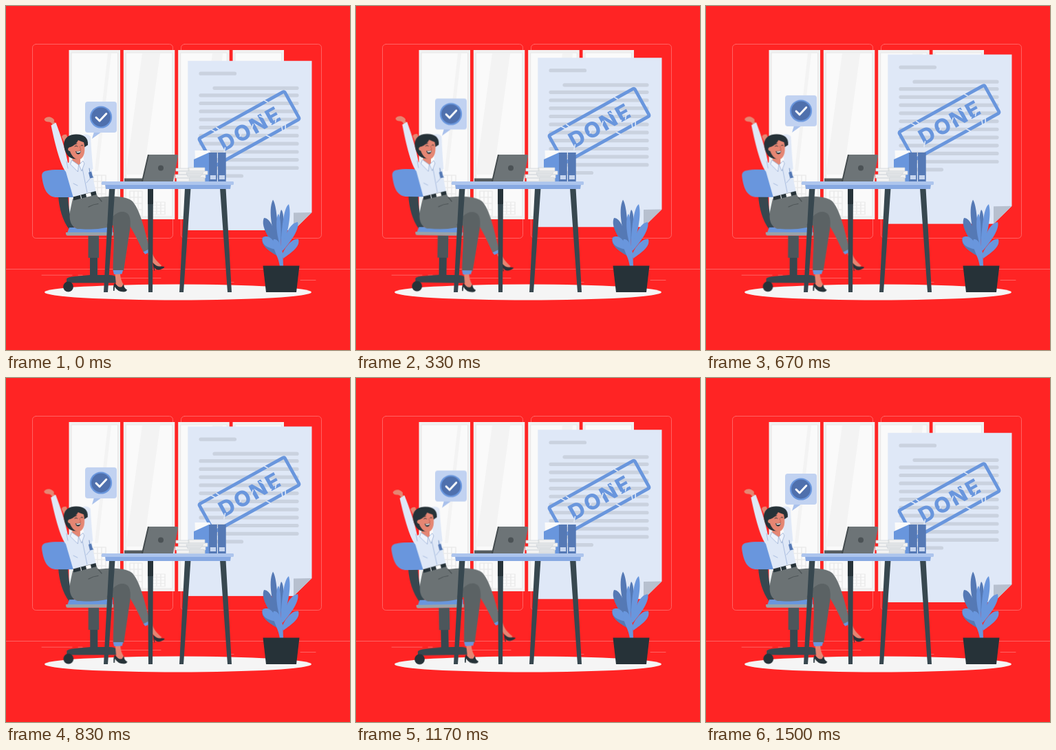
Animation of 500 by 500 pixels, one loop 1540 ms. Source, as an HTML page:

```html
<!DOCTYPE html>
<html lang="en">
<head>
<meta charset="utf-8">
<title>Done</title>
<style>
  html, body { margin: 0; width: 100%; height: 100%; overflow: hidden; background: #ff2424; }
  svg { display: block; width: 100%; height: 100%; }
  .float { animation: float 1540ms linear infinite; }
  .sway { transform-origin: 141px 288px; animation: sway 1540ms linear infinite; }
  @keyframes float {
    0%, 97.4%, 100% { transform: translateY(0); }
    48.7% { transform: translateY(-10.2px); }
  }
  @keyframes sway {
    0%, 100% { transform: rotate(0); }
    25% { transform: rotate(1deg); }
    75% { transform: rotate(-1deg); }
  }
  .blue { fill: #6996dd; }
  .navy { fill: #5579b5; }
  .pale { fill: #dfe8f7; }
  .skin { fill: #e58673; }
  .ink { fill: #263238; }
  .slate { fill: #37474f; }
  .line { fill: none; stroke-linecap: round; stroke-linejoin: round; }
  .stamp { font: 800 31px Inter, "Open Sans", sans-serif; letter-spacing: 2.6px; }
</style>
</head>
<body>
<svg viewBox="0 0 500 500">
  <defs>
    <g id="pane">
      <path fill="#f1f1f1" d="M0 0h74.5v246H0z"/>
      <path fill="#fafafa" stroke="#e4e4e4" stroke-width=".8" d="M3.5 4h67.5v238H3.5z"/>
    </g>
    <g id="block" class="line" stroke="#ebebeb" stroke-width="1.6">
      <path d="M0 0h18v36H0zM0 9h18M0 18h18M0 27h18M6 0v36M12 0v36"/>
    </g>
  </defs>

  <!-- room -->
  <g class="line" stroke="#ff7474" stroke-width=".8">
    <rect x="38.5" y="55.5" width="204" height="282" rx="5"/>
    <rect x="254.500" y="55.5" width="204" height="282" rx="5"/>
    <path d="M0 382.500H500M52 391.200H96M105 391.200h6M165 395.500H225M322 401.500h9M428 398.500H450"/>
  </g>
  <use href="#pane" x="91.500" y="64"/>
  <use href="#pane" x="170.800" y="64"/>
  <use href="#pane" x="250.200" y="64"/>
  <use href="#pane" x="329.500" y="64"/>
  <g fill="#f3f3f3">
    <path d="M148 69h5L134 240h-5zM198 69h26L200 245h-26zM300 69h15l-4 40h-16z"/>
  </g>
  <use href="#block" x="127" y="246"/>
  <use href="#block" x="180" y="269"/>
  <use href="#block" transform="translate(213 285) scale(1 .5)"/>
  <ellipse cx="250" cy="416" rx="194" ry="11.500" fill="#f5f5f5"/>

  <!-- document -->
  <g class="float">
    <path class="pale" d="M264.300 79.700H444.500V300L418 326H264.300z"/>
    <path fill="#b7c0cf" d="M444.500 300L418 326V300.500z"/>
    <path class="line" stroke="#cad2df" stroke-width="5.200" d="M283 98.200h49.500M303 119.300H423M283 129.800H423M283 141.500H423M283 153.200H423M283 165H423M283 176.700H423M283 188.400H423M283 200.200H423M283 212H423M283 223.600H423M283 235.400H423M283 247h59.500"/>
    <g transform="translate(353.500 178.500) rotate(-29)">
      <rect class="line" x="-71" y="-23" width="142" height="46" rx="2" stroke="#6996dd" stroke-width="4.800"/>
      <text class="stamp blue" x="1.300" y="11.300" text-anchor="middle">DONE</text>
      <path class="line" stroke="#dfe8f7" stroke-width="1.600" d="M39 -26l3 5M-49 -26l4 6M-41 -25l2 4M17 20l4 6M43 20l-2 6M49 20l-3 6M-44 7l-5 6M-27 -9l4 5M-12 -1l-5 4M8 -3l-5 5M22 -9l5 6M26 6l6 3M42 5l-4 5"/>
    </g>
  </g>

  <!-- chair and woman -->
  <g class="sway">
    <path class="slate" d="M76 276h14C91 294 93 308 99 322l-7 3C82 312 77 293 76 276z"/>
    <path class="blue" d="M59 239.500C67 237.800 77 237.800 88 238.500L99 278H74C61 278 55 268 52.300 249C51.500 243 54 240.200 59 239.500z"/>
    <path class="blue" d="M92 322h63v8H89z"/>
    <path fill="#99a3a9" d="M87 329h69v4.800H89Q86.500 333 87 329z"/>
    <path fill="#4c565b" d="M119.500 334H135v32h-15.500z"/>
    <path class="slate" d="M122 366h11v25h17q8 0 10 3v8.500H88v-6q2-3 12-3.500l22-2z"/>
    <circle class="ink" cx="90.500" cy="408" r="7.400"/>

    <!-- legs -->
    <path class="skin" d="M206 360l6-3c2 8 6 13 14 20l-3 4c-7-2-10-9-17-21z"/>
    <path class="ink" d="M213.500 373q5 6 11 5.500 5-.5 6 1-2 2.500-8 4-5 .5-7-4l.8 5h-1.300z"/>
    <path class="skin" d="M158.500 389h7.500c0 7 3 13 6 18l-4 4-8-6z"/>
    <path class="ink" d="M158 402.500q6 8 10.500 5.500l2.500-4q0 6 5 8.500-1 3-5 3-9 0-13-7.500l-.5 6H156q-.5-8 2-11.500z"/>
    <path fill="#6b7274" d="M97 280L131 273l3 5C155 275.500 176 276 184 284C197 300 202 330 209 353l-9 5C190 337 180 316 169 306L155 319C143 325 119 325 104 324C92 320 91 306 94 294z"/>
    <path class="line" stroke="#4c5355" stroke-width="1.200" d="M120 292q7-4 14-4.500M134 278l5 6"/>
    <path fill="#5b6264" d="M146 319C153 307 160 299 169 299C179 299 182 308 180.500 322L171 385H155.500C155.500 360 158 343 156 319z"/>
    <path class="blue" d="M155.500 384H170l-1.500 5.500-11.500.5zM199.500 357.500l9-4.500.8 4.800-7 3z"/>

    <!-- far arm, torso, near arm -->
    <path class="skin" d="M81 190q2-4 7-3l3 9-6 3z"/>
    <path class="pale" d="M109 188Q119 184 123 190Q124 211 126.500 237L116 241L113 224z"/>
    <path class="skin" d="M73 171l-5 3c-1-3-2-5-5-5.500-4 .2-6.500-1-7.500-3.500 1-3.500 6-4.500 9-3.500 4 1.500 7 4 5 6.500z"/>
    <path class="pale" d="M65.500 173.500L72.500 169.500C79 187 86 207 90 228L96 225L113 228L123 233Q126 240 125.500 246L131 271L98 279L87 241C80 233 72 205 65.500 173.500z"/>
    <path class="ink" d="M97.500 277.500l33-8.500 1 5-33 8.500z"/>
    <path fill="#fff" d="M116 273l7-1.800 1 5-7 1.500zM108 275l1-.3 1 5-1 .3z"/>
    <path class="line" stroke="#a9bddf" stroke-width="1" d="M111 236l7 35M88 226l2 10M122 251l-5 6M98 258l6 3"/>
    <path class="skin" d="M97 215l11 5v9l-4 4-8-6z"/>
    <path fill="#eef3fc" stroke="#9aafd3" stroke-width=".8" d="M95.500 224l10 7-1 10-11-11zM106 231l6-6 2 4-4 11z"/>
    <path class="navy" d="M120 242l4-1.500 2.500 9-4.500 1z"/>
    <path class="line" stroke="#5579b5" stroke-width=".8" d="M121 236l1 7M124 246l3 3"/>

    <!-- head -->
    <path class="ink" d="M84 201C85 189 95 186 103 186.500C113 187 120 191 119 202L113 206L105 222C92 224 85 215 84 201z"/>
    <path class="skin" d="M94 205C99 203 103 199 105 195C108 196 112 198 113 198C116 209 114 221 107 223C100 224 95 217 93 211C89 211 89 205 94 205z"/>
    <path class="line" stroke="#263238" stroke-width=".9" d="M100 204q2-2 4 0M109 203q2-2 3 0M100 201l3-1"/>
    <path class="line" stroke="#bd5d50" stroke-width=".8" d="M107 204l2 5-2 .5"/>
    <path class="ink" d="M101 211q4 1 8-.5-1 5-4 5-3 0-4-4.500z"/>
    <path fill="#fff" d="M102 211.500q3 .8 6.500-.4l-.5 1.500q-3 1-5 .5z"/>
  </g>

  <!-- speech bubble -->
  <g class="float">
    <path fill="#a9c1ec" d="M128 183h11l-14 10z"/>
    <rect x="115" y="139" width="46" height="45" rx="4" fill="#c1d2f1"/>
    <circle cx="138" cy="161.500" r="15" fill="#4f70ad" stroke="#6996dd" stroke-width="2.200"/>
    <path class="line" stroke="#fff" stroke-width="2.900" d="M131 162l5 5 9.800-10.500"/>
  </g>

  <!-- desk -->
  <path class="slate" d="M150 265h8.500L148 416h-6zM206 265h8L213 416h-6zM260 265h8.500L258 416h-6zM311 265h8.500L328 416h-6z"/>
  <path class="ink" d="M206 265h8l-.2 23h-7.700z"/>
  <path fill="#87a9e2" d="M144 259h183l-1 7H145z"/>
  <path fill="#adc5ed" d="M139.500 255H330q1 0 1 1.500v2q0 1.500-1.500 1.500H140q-1.500 0-1.500-2z"/>

  <!-- laptop -->
  <path fill="#565d60" d="M172 250.500h27v4.500h-27z"/>
  <path fill="#434a4d" d="M206 216h3l-8 39h-4z"/>
  <path fill="#6d7477" d="M208 216h40q2.300 0 2 2l-7 37h-44z"/>
  <circle cx="225" cy="235.500" r="4" fill="#4b5255"/>

  <!-- folders and papers -->
  <path fill="#fafafa" d="M274.500 210H296l2 5-23 9z"/>
  <path class="blue" d="M273 223l22-10v42h-22z"/>
  <path class="navy" d="M295 213h11.800v42H295zM308 213h11.700v42H308z"/>
  <path fill="#c6d5ef" d="M296.800 246h8.200v6h-8.200zM309.800 246h8.200v6h-8.200z"/>
  <g fill="#f2f2f2" stroke="#cfd4d8" stroke-width=".7">
    <path d="M248 250h41v5h-41zM246 245h44v5h-44zM251 240h42v5h-42zM247 236h19v4h-19zM265 235h24v5h-24z"/>
    <path d="M262 242h25l-5 6h-18zM267 249h20l2 5h-23z" fill="#dfe2e5"/>
  </g>

  <!-- plant -->
  <g class="navy">
    <path d="M388 281.500C394 291 394 317 398 349L395 350C388 330 380 298 388 281.500z"/>
    <path d="M400 296C405 301 404 322 400 344C397 327 396 304 400 296z"/>
    <path d="M375 308C384 308 391 325 398 352L395 355C385 342 369 321 375 308z"/>
    <path d="M373 336C384 331 394 343 399 366C386 358 369 350 373 336z"/>
  </g>
  <g class="blue">
    <path d="M411 288C415 302 411 324 402 354L399 350C401 325 403 294 411 288z"/>
    <path d="M396 302C400 309 400 328 399 350C393 334 391 309 396 302z"/>
    <path d="M424 314C427 323 416 340 402 356L400 353C405 333 413 315 424 314z"/>
    <path d="M373 337C382 331 390 340 394 354C384 353 370 348 373 337z"/>
    <path d="M389 339C396 338 402 349 402.500 364L403 379H398C397 364 384 349 389 339z"/>
    <path d="M425 339C428 350 415 358 403 367L401 362C406 350 416 337 425 339z"/>
  </g>
  <path class="ink" d="M373.500 377.500H426.500L422 416H378z"/>
</svg>
</body>
</html>
```
